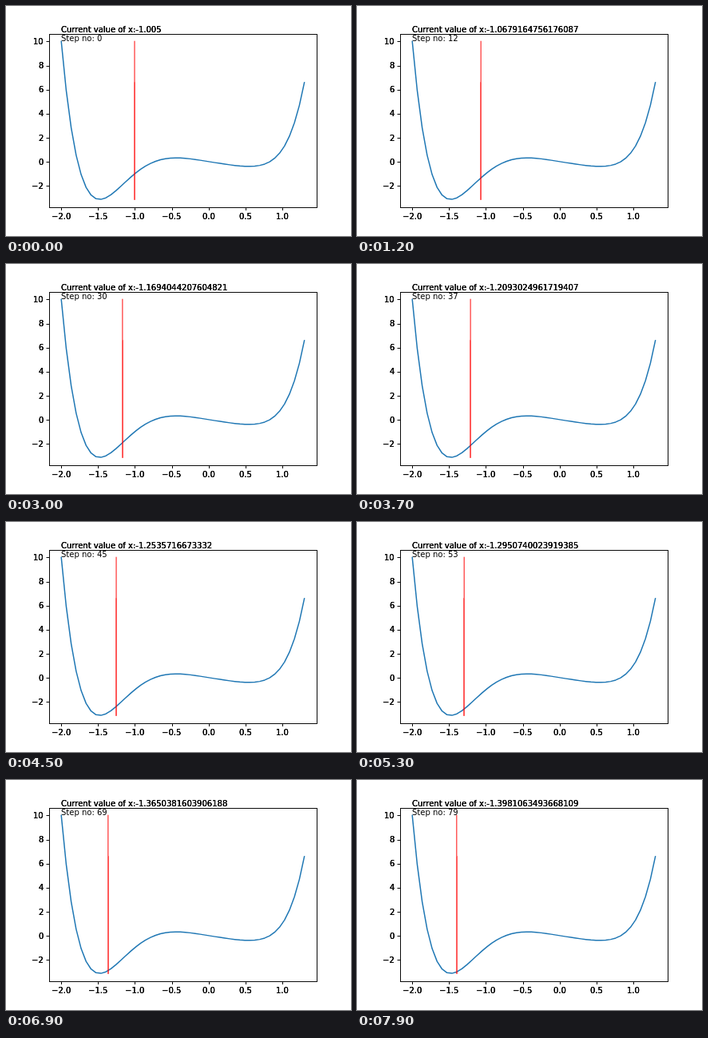
Recreate the animation shown at these times as an HTML page with a canvas. Size 432 by 288 pixels, loop 8000 ms.

```html
<!DOCTYPE html>
<html lang="en">
<head>
<meta charset="utf-8">
<title>Gradient descent</title>
<style>
  html, body { margin: 0; width: 100%; height: 100%; overflow: hidden; background: #fff; }
  canvas { display: block; }
</style>
</head>
<body>
<canvas id="stage" width="432" height="288"></canvas>
<script>
const ctx = document.getElementById('stage').getContext('2d');
const STEPS = 80, STEP_MS = 100, RATE = 0.001, SAMPLES = 50;
const X_MIN = -2, X_MAX = 1.3;
const LEFT = 54, RIGHT = 388.8, TOP = 34.56, BOTTOM = 252;

const f = x => x ** 6 + x ** 5 - x ** 4 + x ** 3 - x;
const slope = x => 6 * x ** 5 + 5 * x ** 4 - 4 * x ** 3 + 3 * x ** 2 - 1;

const xs = Array.from({ length: SAMPLES }, (_, i) => X_MIN + (X_MAX - X_MIN) * i / (SAMPLES - 1));
const ys = xs.map(f);
const yMin = Math.min(...ys), yMax = Math.max(...ys);

// The data fills the axes apart from a 5% margin on each side.
const scale = (v, lo, hi, from, to) => from + (to - from) * ((v - lo) / (hi - lo) + 0.05) / 1.1;
const px = x => scale(x, X_MIN, X_MAX, LEFT, RIGHT);
const py = y => scale(y, yMin, yMax, BOTTOM, TOP);

const positions = [];
for (let i = 0, x = -1; i < STEPS; i++) {
  x -= RATE * slope(x);
  positions.push(x);
}

function text(str, x, y, passes = 1) {
  for (let i = 0; i < passes; i++) ctx.fillText(str, Math.round(x), Math.round(y));
}

function drawAxes() {
  const x0 = 54, x1 = 389, y0 = 35, y1 = 252;
  ctx.fillStyle = 'rgba(0,0,0,.96)';
  ctx.fillRect(x0, y0, 1, y1 - y0 + 1);
  ctx.fillRect(x1, y0, 1, y1 - y0 + 1);
  ctx.fillRect(x0 + 1, y0, x1 - x0 - 1, 1);
  ctx.fillRect(x0 + 1, y1, x1 - x0 - 1, 1);

  const minus = s => s.replace('-', '\u2212');
  for (let v = -2; v <= 1; v += 0.5) {
    const label = minus(v.toFixed(1)), x = px(v);
    ctx.fillRect(Math.round(x), y1 + 1, 1, 3);
    text(label, x - ctx.measureText(label).width / 2, 267, 3);
  }
  for (let v = -2; v <= 10; v += 2) {
    const label = minus(String(v)), y = py(v);
    ctx.fillRect(x0 - 3.5, Math.round(y), 3.5, 1);
    text(label, 47 - ctx.measureText(label).width, y + 3.8, 3);
  }
}

function drawCurve() {
  ctx.beginPath();
  xs.forEach((x, i) => ctx.lineTo(px(x), py(ys[i])));
  ctx.strokeStyle = '#1f77b4';
  ctx.lineWidth = 1.5;
  ctx.lineJoin = 'round';
  ctx.lineCap = 'square';
  ctx.stroke();
}

// The marker runs down and back up to the last sample, so edge coverage doubles on the lower part.
function drawMarker(x) {
  const a = px(x) - 0.75, b = a + 1.5;
  const top = py(yMax) - 0.75, mid = py(ys[SAMPLES - 1]) - 0.75, end = py(yMin) + 0.75;
  for (let c = Math.floor(a); c < b; c++) {
    const cover = Math.min(b, c + 1) - Math.max(a, c);
    const bar = (from, to, amount) => {
      ctx.fillStyle = `rgba(255,0,0,${0.65 * Math.min(1, amount)})`;
      ctx.fillRect(c, from, 1, to - from);
    };
    bar(top, mid, cover);
    bar(mid, end, 2 * cover);
  }
}

function draw(now) {
  const step = Math.floor(now / STEP_MS) % STEPS;
  ctx.fillStyle = '#fff';
  ctx.fillRect(0, 0, 432, 288);
  ctx.font = '10px "DejaVu Sans", sans-serif';
  drawCurve();
  drawMarker(positions[step]);
  drawAxes();
  ctx.fillStyle = '#000';
  const shown = step ? positions[step] : positions[0].toFixed(3);
  text('Current value of x:' + shown, 69, 33, 3);
  text('Step no: ' + step, 69, 44);
}

const start = performance.now();
function tick() {
  draw(performance.now() - start);
  requestAnimationFrame(tick);
}
tick();
</script>
</body>
</html>
```
